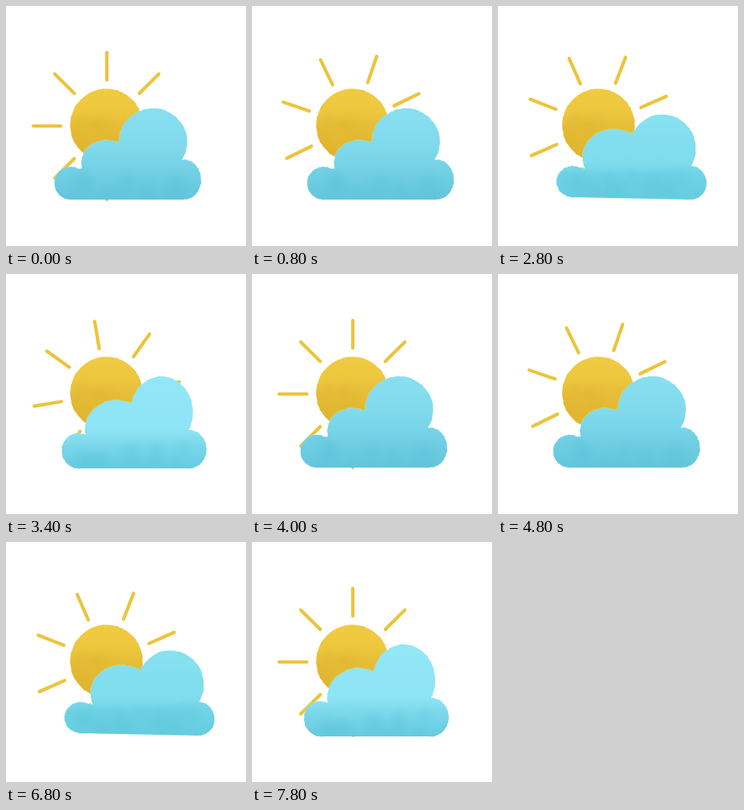
Write an HTML page with a canvas that moves like this. It is 300 by 300 pixels and loops after 8.01 s.

```html
<!DOCTYPE html>
<html lang="en">
<head>
<meta charset="utf-8">
<title>Sun and cloud</title>
<style>
html, body { margin: 0; width: 100%; height: 100%; overflow: hidden; background: #fff; }
canvas { display: block; width: 300px; height: 300px; }
</style>
</head>
<body>
<canvas id="stage" width="300" height="300"></canvas>
<script>
const ctx = document.getElementById('stage').getContext('2d');
const LOOP = 8010, STEP = 200, CYCLE = 20, HOLD = 5;
const TAU = Math.PI * 2;

function random(seed) {
  return () => (seed = (seed * 16807) % 2147483647) / 2147483647;
}

// Ellipse with a slightly ragged, brushed edge.
function addLobe(path, x, y, rx, ry, rnd) {
  const n = 90;
  for (let i = 0; i < n; i++) {
    const a = i / n * TAU, rough = (rnd() - .5) * .9;
    const point = [x + (rx + rough) * Math.cos(a), y + (ry + rough) * Math.sin(a)];
    i ? path.lineTo(...point) : path.moveTo(...point);
  }
  path.closePath();
}

function gradient(top, bottom, stops) {
  const g = ctx.createLinearGradient(0, top, 0, bottom);
  stops.forEach(([at, color]) => g.addColorStop(at, color));
  return g;
}

// Soft blotches of watercolour scattered over a box.
function blotches(rnd, count, color, x, y, w, h) {
  return Array.from({ length: count }, () => {
    const r = 12 + rnd() * 12, cx = x + rnd() * w, cy = y + rnd() * h;
    const fill = ctx.createRadialGradient(cx, cy, 0, cx, cy, r);
    fill.addColorStop(0, color + '38');
    fill.addColorStop(1, color + '00');
    return fill;
  });
}

function makeSun() {
  const rnd = random(7), path = new Path2D();
  addLobe(path, 125.6, 148.9, 45.4, 45.4, rnd);
  return {
    path,
    fill: gradient(103, 193, [[0, '#efcb42'], [.3, '#edc83e'], [.5, '#e6be38'], [1, '#dfb32e']]),
    spots: blotches(rnd, 6, '#dcb02d', 85, 140, 45, 40)
  };
}

// Each lobe is [x, y, rx, ry]; the base joins the two end lobes.
function makeCloud(seed, left, right, mid, top, tones) {
  const rnd = random(seed), path = new Path2D();
  for (const lobe of [left, right, mid, top]) addLobe(path, ...lobe, rnd);
  path.moveTo(left[0], left[1] - left[3] + 3);
  path.lineTo(right[0], right[1] - right[3] + 3);
  path.lineTo(right[0], right[1] + right[3]);
  path.lineTo(left[0], left[1] + left[3]);
  path.closePath();
  return {
    path,
    fill: gradient(128, 243, tones),
    spots: blotches(rnd, 12, '#58c0d7', left[0], 214, right[0] - left[0], 24)
  };
}

const sun = makeSun();
const clouds = [
  makeCloud(31, [81, 221.5, 20.5, 20.5], [222, 217, 22, 25], [126, 197, 32, 29], [184, 170, 42.5, 42],
    [[0, '#89dff0'], [.4, '#80daec'], [.68, '#73d0e4'], [1, '#62c5dc']]),
  makeCloud(32, [86, 221, 21, 22], [224, 219, 22, 24], [134, 195, 40, 37], [190, 173, 39, 45],
    [[0, '#92e7f7'], [.58, '#8de4f4'], [.76, '#7ad7e9'], [1, '#66cbe0']]),
  makeCloud(33, [82, 219.5, 20.5, 19.5], [229, 221, 20, 21], [133.5, 190, 39.5, 36], [194, 178, 41.5, 42.5],
    [[0, '#88e2f2'], [.6, '#7edcec'], [.72, '#6fd3e5'], [1, '#65cce0']])
];

function paint({ path, fill, spots }) {
  ctx.fillStyle = fill;
  ctx.fill(path);
  for (const spot of spots) {
    ctx.fillStyle = spot;
    ctx.fill(path);
  }
}

function drawRays(turn) {
  ctx.strokeStyle = '#ebc43b';
  ctx.lineCap = 'round';
  ctx.lineWidth = 4.2;
  ctx.beginPath();
  for (let k = 0; k < 8; k++) {
    const a = turn + k / 8 * TAU, c = Math.cos(a), s = Math.sin(a);
    ctx.moveTo(126 + 57.5 * c, 150 + 57.5 * s);
    ctx.lineTo(126 + 92 * c, 150 + 92 * s);
  }
  ctx.stroke();
}

function drawCloud(cloud, drift) {
  ctx.save();
  ctx.translate(drift, 0);
  // pale rim only where the cloud overlaps the sun
  ctx.globalCompositeOperation = 'source-atop';
  ctx.strokeStyle = '#cfd272';
  ctx.lineWidth = 2.2;
  ctx.stroke(cloud.path);
  ctx.globalCompositeOperation = 'source-over';
  paint(cloud);
  ctx.restore();
}

function draw(time) {
  const last = CYCLE - 1;
  const i = Math.min(2 * CYCLE - 1, Math.floor((time % LOOP) / STEP)) % CYCLE;
  const drift = 21 * Math.min(i / 10, (last - i) / 9);
  const shape = [0, 1, 2, 1][Math.floor(i / HOLD)];
  ctx.clearRect(0, 0, 300, 300);
  drawRays(i / last * TAU / 4);
  paint(sun);
  drawCloud(clouds[shape], drift);
}

const start = performance.now();
function tick() {
  draw(performance.now() - start);
  requestAnimationFrame(tick);
}
tick();
</script>
</body>
</html>
```
